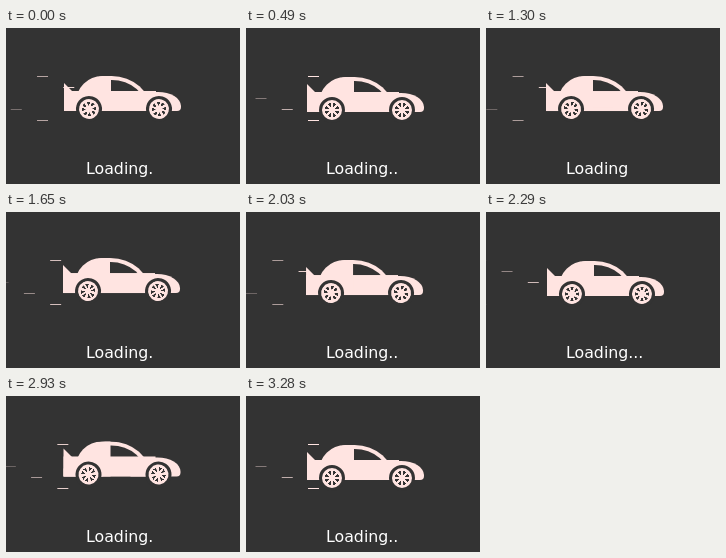
Animation of 234x156 px, one loop 3.3 s. Source, as an HTML page:

```html
<!DOCTYPE html>
<html lang="en">
<head>
<meta charset="utf-8">
<title>Loading</title>
<style>
  :root { --paint: #ffe4e1; --road: #333; }
  html, body { margin: 0; width: 100%; height: 100%; overflow: hidden; background: var(--road); }
  .stage { position: relative; width: 234px; height: 156px; overflow: hidden; background: var(--road); }
  .strike { position: absolute; left: 62px; width: 11px; height: 1px; background: var(--paint); }
  .car { position: absolute; left: 61px; top: 49px; width: 117px; height: 46px; }
  .car div { position: absolute; box-sizing: border-box; background: var(--paint); }
  .car .spoiler { top: 7px; left: 0; width: 0; height: 0; background: none;
    border: 20px solid transparent; border-bottom: 8px solid var(--paint); border-left-color: var(--paint); }
  .car .back { top: 15px; left: 0; width: 92px; height: 20px; }
  .car .cabin { top: 0; left: 12px; width: 75px; height: 35px; background: none;
    border: 4px solid var(--paint); border-radius: 30px 45px 0 0 / 30px 40px 0 0; }
  .car .rear { top: 0; left: 12px; width: 35px; height: 35px; border-top-left-radius: 30px; }
  .car .front { top: 16px; left: 67px; width: 50px; height: 19px;
    border-top-right-radius: 23px 14px; border-bottom-right-radius: 4px; }
  .car .wheel { --spoke: transparent 45%, var(--paint) 46%, var(--paint) 54%, transparent 55%;
    top: 20px; left: 12px; width: 26px; height: 26px; border-radius: 50%; border: 3px solid var(--road);
    background:
      linear-gradient(45deg, var(--spoke)),
      linear-gradient(-45deg, var(--spoke)),
      linear-gradient(90deg, var(--spoke)),
      linear-gradient(0deg, var(--spoke)),
      radial-gradient(var(--paint) 23%, transparent 24%, transparent 50%, var(--paint) 51%),
      var(--road); }
  .car .wheel.fore { left: 82px; }
  .text { position: absolute; left: 80px; top: 131px; font: 15.8px/19px "DejaVu Sans", sans-serif;
    color: #fff; white-space: pre; }
</style>
</head>
<body>
<div class="stage">
  <div class="strike"></div>
  <div class="strike"></div>
  <div class="strike"></div>
  <div class="strike"></div>
  <div class="strike"></div>
  <div class="car">
    <div class="spoiler"></div>
    <div class="back"></div>
    <div class="cabin"></div>
    <div class="rear"></div>
    <div class="front"></div>
    <div class="wheel"></div>
    <div class="wheel fore"></div>
  </div>
  <div class="text">Loading<span id="dots">.</span></div>
</div>
<script>
  const LOOP = 3300, TICK = 29.03, DOT_STEP = 363, TRAVEL = 105;

  // [tick, turns]: the drive cycle runs at a slightly uneven pace
  const PACE = [[0, 0.295], [17, 3], [33, 5.505], [57, 9.17], [70, 11.34], [88, 14.045], [113, 18]];
  // [turn, x, y]: one jolt of the car body
  const JOLT = [[0, 0, 0], [0.04, -3, -4], [0.167, -4, -3], [0.295, -3, -1], [0.333, -1, -1], [0.5, 0, 0], [1, 0, 0]];

  const strikes = [...document.querySelectorAll('.strike')];
  const wheels = [...document.querySelectorAll('.wheel')];
  const car = document.querySelector('.car');
  const dots = document.getElementById('dots');

  function sample(table, at, col) {
    let i = 1;
    while (i < table.length - 1 && at >= table[i][0]) i++;
    const a = table[i - 1], b = table[i];
    return a[col] + (b[col] - a[col]) * (at - a[0]) / (b[0] - a[0]);
  }

  const frac = v => v - Math.floor(v);

  strikes.forEach((s, i) => { s.style.top = 48 + 11 * i + 'px'; });

  function draw(t) {
    // poses are held for one tick each
    const turns = sample(PACE, Math.floor((t + 9) / TICK), 1) + 1e-6;
    const turn = frac(turns);
    strikes.forEach((s, i) => {
      const p = frac(turns - i / 4);
      s.style.transform = `translateX(${-TRAVEL * p}px)`;
      s.style.opacity = Math.max(0, 1 - 1.2 * p);
    });
    car.style.transform = `translate(${sample(JOLT, turn, 1)}px, ${sample(JOLT, turn, 2)}px)`;
    wheels.forEach(w => { w.style.transform = `rotate(${360 * turn}deg)`; });
    dots.textContent = '.'.repeat((1 + Math.floor((t + 63) / DOT_STEP)) % 4);
  }

  const start = performance.now();
  function tick() {
    draw((performance.now() - start) % LOOP);
    requestAnimationFrame(tick);
  }
  draw(0);
  requestAnimationFrame(tick);
</script>
</body>
</html>
```
